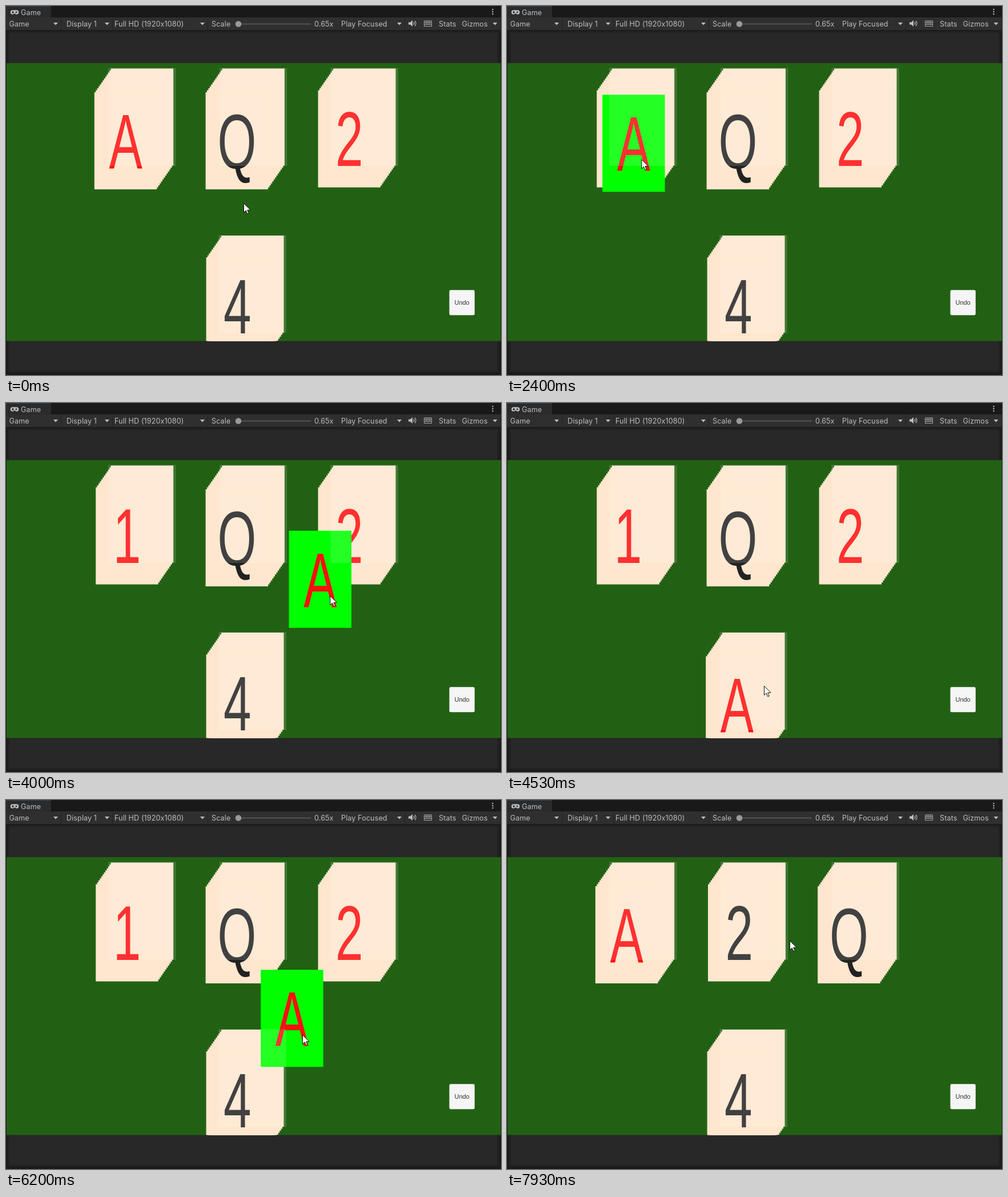
Animation of 867x646 px, one loop 8000 ms. Source, as an HTML page:

```html
<!DOCTYPE html>
<html lang="en">
<head>
<meta charset="utf-8">
<title>Card game view</title>
<style>
html, body { margin: 0; width: 100%; height: 100%; overflow: hidden; background: #191919; }
svg { display: block; width: 867px; height: 646px; }
.ui { font: 12.6px Inter, Roboto, sans-serif; letter-spacing: .1px; fill: #bebebe; }
.face { font: 135.5px "Liberation Sans", Arial, sans-serif; text-anchor: middle; }
.undo { font: 11px "Liberation Sans", Arial, sans-serif; text-anchor: middle; fill: #323232; }
</style>
</head>
<body>
<svg viewBox="0 0 867 646">
  <defs>
    <clipPath id="view"><rect x="1" y="100" width="865.5" height="486.5"/></clipPath>
    <clipPath id="panel"><rect x="1" y="42" width="865" height="602"/></clipPath>
  </defs>
  <rect width="867" height="646" fill="#191919"/>
  <rect width="79" height="21" fill="#2b2b2b"/>
  <rect width="79" height="1" fill="#28465f"/>
  <rect y="20" width="867" height="22" fill="#2f2f2f"/>
  <g id="frame" clip-path="url(#panel)"><rect y="42" width="867" height="602" fill="#282828"/></g>
  <g id="bar" class="ui">
    <path d="M11.5 7.2h7a3.6 3.6 0 0 1 0 7.6q-1.7 0-2.5-1.6h-2q-.8 1.6-2.5 1.6a3.6 3.6 0 0 1 0-7.6z"/>
    <path d="M10 11h4M12 9v4" stroke="#2b2b2b" stroke-width="1.3"/>
    <circle cx="18" cy="11" r="1.4" fill="#2b2b2b"/>
    <text x="26" y="16">Game</text>
    <path d="M705 28.5h3l4-3.5v11l-4-3.5h-3z"/>
    <path d="M714 28q2 2.5 0 5M716 26q4 4.500 0 9" fill="none" stroke="#bebebe" stroke-width="1.2"/>
    <path d="M732.5 26h13v9.500h-13zm0 3h13m-13 3.300h13M735.800 26v6.300M739 26v6.300M742.300 26v6.300" fill="none" stroke="#a8a8a8"/>
    <path d="M402 31.500H534" stroke="#5e5e5e" stroke-width="1.500"/>
    <circle cx="407" cy="31.500" r="5.300" fill="#999"/>
    <path d="M852.500 6v9" stroke="#bebebe" stroke-width="2.400" stroke-linecap="round" stroke-dasharray="0 4"/>
  </g>
  <g clip-path="url(#view)">
    <rect y="100" width="867" height="487" fill="#226114"/>
    <g id="piles"></g>
    <g id="cards"></g>
    <g id="slots" fill="#fff" fill-opacity=".14"></g>
    <rect id="button" x="776.500" y="497.200" width="44.300" height="44" rx="2.500"/>
    <text class="undo" x="798.600" y="523">Undo</text>
  </g>
  <path id="cursor" d="M.5.5V16.500L4.200 13 6.800 19 9.200 18 6.700 12.200H12z" fill="#fff" stroke="#111" stroke-linejoin="round"/>
</svg>
<script>
const LOOP = 8000, STEP = 1000 / 15, HOLD = 70;
const W = 109.5, H = 170, DX = -2.4, DY = 3.46, DEPTH = 12;
const CREAM = '#ffe6ce', GREEN = '#0f0', RED = '#ff0e0e', BLACK = '#222';
const $ = id => document.getElementById(id);

function add(parent, tag, attrs, text) {
  const el = document.createElementNS('http://www.w3.org/2000/svg', tag);
  for (const key in attrs) el.setAttribute(key, attrs[key]);
  if (text) el.textContent = text;
  return parent.appendChild(el);
}

// Toolbar: a field with a right end gets a caret and a divider there
function field(label, x, end) {
  add($('bar'), 'text', { x, y: 35.5 }, label);
  if (!end) return;
  add($('bar'), 'path', { d: `M${end - 13} 29h8l-4 4.500z` });
  add($('bar'), 'rect', { x: end, y: 21, width: 1, height: 21, fill: '#232323' });
}
field('Game', 5.5, 96);
field('Display 1', 106, 186);
field('Full HD (1920x1080)', 190, 353);
field('Scale', 360);
field('0.65x', 540);
field('Play Focused', 587, 698);
field('Stats', 758);
field('Gizmos', 798.5, 865.5);

// Soft dark rim of the panel
for (let w = 2; w < 12; w += 3)
  add($('frame'), 'rect', {
    x: 1, y: 42, width: 865, height: 602, fill: 'none',
    stroke: '#000', 'stroke-opacity': .1, 'stroke-width': w
  });

// Piles: corner of the lowest card
const piles = [
  { x: 183.6, y: 109.5, face: '1', ink: RED },
  { x: 378.4, y: 109.5, face: '2', ink: BLACK },
  { x: 573, y: 109.5, face: '2', ink: RED },
  { x: 377, y: 402, face: '4', ink: BLACK }
];
const place = (p, level) => [piles[p].x + level * DX, piles[p].y + level * DY];
const plus = (a, b, k = 1) => [a[0] + k * b[0], a[1] + k * b[1]];
const move = (el, [x, y]) => el.setAttribute('transform', `translate(${x} ${y})`);

function makeCard(parent, face, ink) {
  const g = add(parent, 'g', {});
  const rect = add(g, 'rect', { width: W, height: H, fill: CREAM });
  if (face) add(g, 'text', {
    class: 'face', fill: ink, transform: `translate(${W / 2} 132.900) scale(.644 1)`
  }, face);
  return { g, rect };
}

piles.forEach((pile, p) => {
  for (let k = 0; k < DEPTH; k++) {
    const card = makeCard($('piles'), k === DEPTH - 1 && pile.face, pile.ink);
    move(card.g, place(p, k));
  }
  add($('slots'), 'rect', { x: pile.x - 4.7, y: pile.y - 1, width: 118.5, height: 171.5 });
});

// Movable cards, lying on top of the piles
const loose = (face, ink, pile) =>
  ({ ...makeCard($('cards'), face, ink), pile, home: place(pile, DEPTH), rest: place(pile, DEPTH) });
const queen = loose('Q', BLACK, 1), ace = loose('A', RED, 0);
const cards = [queen, ace];

// Pointer gestures: start and duration in ms; bow bends the way and ends at zero
const gestures = [];
let hand = [416, 345];

function go(start, span, x, y) {
  gestures.push({ start, span, from: hand, way: [x - hand[0], y - hand[1]], bow: [0, 0] });
  hand = [x, y];
}
function drag(card, start, span, pile, bow = [0, 0]) {
  const below = cards.filter(c => c !== card && c.pile === pile).length;
  const rest = card.rest, end = place(pile, DEPTH + below), way = plus(end, rest, -1);
  gestures.push({ start, span, from: hand, way, bow, card, rest, end });
  hand = plus(hand, way);
  Object.assign(card, { pile, rest: end });
}

go(0, 500, 800, 530);
go(1200, 470, 223, 264);
drag(ace, 1670, 768, 0, [512, 180]);
drag(ace, 2440, 100, 1);
go(2800, 270, 419, 268);
drag(ace, 3070, 508, 2, [0, 7]);
drag(ace, 3870, 400, 3);
go(4340, 190, 450, 495);
go(4600, 250, 421, 557);
drag(ace, 4860, 470, 1);
drag(ace, 5500, 430, 2, [0, -27]);
drag(ace, 6000, 400, 3);
go(6470, 200, 422, 495);
drag(ace, 6790, 430, 0, [36, -11]);
go(7290, 240, 405, 220);
drag(queen, 7530, 200, 2, [0, 25]);
go(7800, 130, 495, 246);

function travel(g, t) {
  const u = Math.min(1, (t - g.start) / g.span);
  return plus(plus([0, 0], g.way, u * u * (3 - 2 * u)), g.bow, Math.sin(Math.PI * u) ** 2);
}

function showCard(card, t) {
  const g = gestures.findLast(g => g.card === card && g.start <= t);
  const held = g && t < g.start + g.span + HOLD;
  move(card.g, held ? plus(g.rest, travel(g, t)) : g ? g.end : card.home);
  card.rect.setAttribute('fill', held ? GREEN : CREAM);
}

// Grey while pressed, then a short fade back
function press(t, down) {
  const up = down + 140;
  return t < down ? 0 : t < up ? 1 : Math.max(0, 1 - (t - up + 15) / 80);
}

function render(ms) {
  const t = Math.floor((ms % LOOP + 4) / STEP) * STEP;
  cards.forEach(card => showCard(card, t));
  const shade = Math.round(245 - 45 * (press(t, 720) + press(t, 1125)));
  $('button').setAttribute('fill', `rgb(${shade},${shade},${shade})`);
  const g = gestures.findLast(g => g.start <= t);
  move($('cursor'), plus(g.from, travel(g, t)));
}

const start = performance.now();
(function tick() {
  render(performance.now() - start);
  requestAnimationFrame(tick);
})();
</script>
</body>
</html>
```
